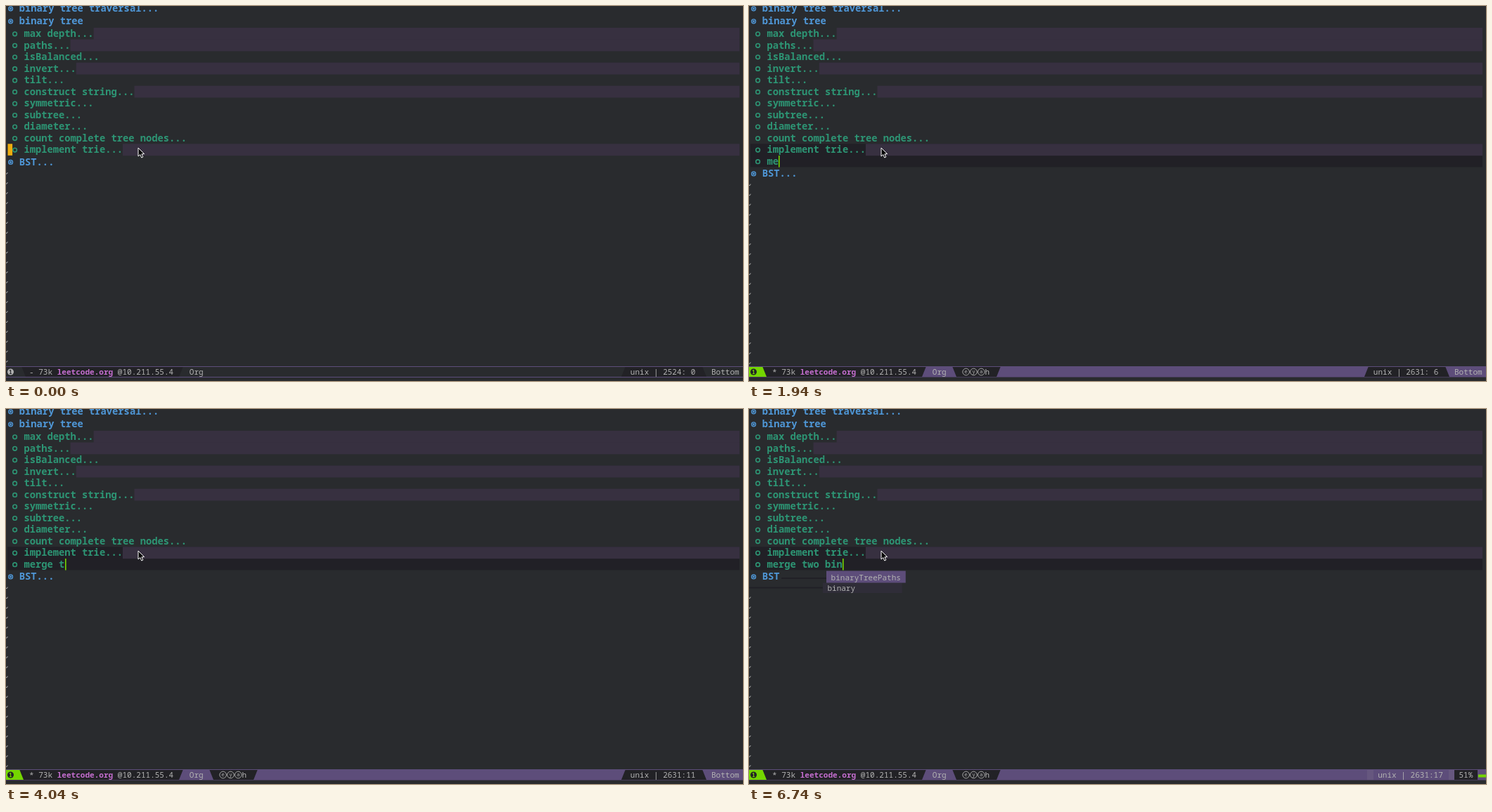
These frames come from a looping animation (1048x534 px, 8000 ms). An HTML page with a canvas:

```html
<!DOCTYPE html>
<html lang="en">
<head>
<meta charset="utf-8">
<title>Outline editing</title>
<style>
  html, body { margin: 0; width: 100%; height: 100%; overflow: hidden; background: #292b2e; }
  canvas { display: block; }
</style>
</head>
<body>
<canvas id="stage" width="1048" height="534"></canvas>
<script>
const ctx = document.getElementById('stage').getContext('2d');
const LOOP = 8000;
const C = {
  bg: '#292b2e', dark: '#212026', bar: '#222226', block: '#373040', purple: '#5d4d7a',
  text: '#b2b2b2', blue: '#4f97d7', green: '#2d9574', lime: '#74d600',
  gold: '#eead0e', pink: '#c56ed0', tip: '#2f2d38'
};
const BIG = 13.78, SMALL = 11.03;
const ROW = 16.53, TOP = 31, TEXT_X = 25.4, CELL = BIG * 0.6;
const BAR_Y = 513, BAR_H = 15;

const items = ['max depth', 'paths', 'isBalanced', 'invert', 'tilt', 'construct string',
  'symmetric', 'subtree', 'diameter', 'count complete tree nodes', 'implement trie'];
const shaded = [0, 1, 3, 5, 10];

// start time, typed text, column shown, completion list
const steps = [
  [1050, '', 4], [1790, 'm', 5], [1940, 'me', 6],
  [2240, 'me', 6, ['median', 'merge']],
  [2390, 'mer', 7], [2690, 'merg', 8], [2990, 'merge', 9],
  [3740, 'merge ', 10], [4040, 'merge t', 11], [4790, 'merge two', 13],
  [5090, 'merge two ', 13], [5240, 'merge two ', 14],
  [6290, 'merge two b', 15], [6440, 'merge two bi', 16], [6590, 'merge two bin', 17],
  [6740, 'merge two bin', 17, ['binaryTreePaths', 'binary']]
];

function rect(x, y, w, h, color) {
  ctx.fillStyle = color;
  ctx.fillRect(x, y, w, h);
}

function poly(points, color) {
  ctx.beginPath();
  points.forEach(([x, y]) => ctx.lineTo(x, y));
  ctx.closePath();
  ctx.fillStyle = color;
  ctx.fill();
}

function circle(x, y, r, fill, stroke, width = 1) {
  ctx.beginPath();
  ctx.arc(x, y, r, 0, Math.PI * 2);
  if (fill) { ctx.fillStyle = fill; ctx.fill(); }
  if (stroke) { ctx.strokeStyle = stroke; ctx.lineWidth = width; ctx.stroke(); }
}

// Text on a fixed character grid, like a terminal.
function mono(str, x, y, size, color, bold) {
  ctx.font = `${bold ? 'bold ' : ''}${size}px "Noto Sans Mono", "DejaVu Sans Mono", monospace`;
  ctx.fillStyle = color;
  [...str].forEach((ch, i) => ctx.fillText(ch, x + i * size * 0.6, y));
}

function heading(str, baseline) {
  const y = baseline - 4.4;
  circle(6.6, y, 3.6, C.blue);
  circle(6.6, y, 1.9, null, C.bg, 0.8);
  mono(str, 18.8, baseline, BIG, C.blue, true);
}

function item(str, row) {
  const y = TOP + ROW * row;
  circle(12.6, y + 8.8, 2.8, null, C.green, 1.6);
  mono(str, TEXT_X, y + 13, BIG, C.green, true);
}

function tildes(from) {
  ctx.strokeStyle = C.text;
  ctx.lineWidth = 1;
  for (let y = from; y < 510; y += 14.1) {
    ctx.beginPath();
    ctx.moveTo(2.2, y - 1);
    ctx.quadraticCurveTo(2.2, y + 1, 0, y + 1.2);
    ctx.stroke();
  }
}

function pointer(x, y) {
  ctx.beginPath();
  [[0, 0], [0, 12], [2.8, 9.6], [4.8, 14], [6.8, 13], [4.9, 8.8], [8.6, 8.6]]
    .forEach(([dx, dy]) => ctx.lineTo(x + dx, y + dy));
  ctx.closePath();
  ctx.fillStyle = '#000';
  ctx.fill();
  ctx.strokeStyle = '#fff';
  ctx.lineWidth = 1;
  ctx.stroke();
}

// Bar section; lean is the sideways shift of each edge towards the bottom.
function section(x0, x1, color, lean0 = 0, lean1 = 0) {
  const b = BAR_Y + BAR_H;
  poly([[x0, BAR_Y], [x1, BAR_Y], [x1 + lean1, b], [x0 + lean0, b]], color);
}

function barText(str, x, color = C.text, bold = false) {
  mono(str, x, 525, SMALL, color, bold);
}

function badge(fill, ink) {
  circle(6.5, 521, 4.5, fill);
  mono('1', 4.1, 523.9, 8, ink, true);
}

function modeLine(active, position, popup) {
  if (active) {
    section(0, 1048, C.purple);
    section(18, 252, C.bar, 0, -6);
    section(0, 19, C.lime, 0, 6);
    section(289, 358, C.bar, 6, -6);
    badge(C.bar, C.lime);
    ['e', 'y', 'a'].forEach((ch, i) => {
      const x = 308.6 + i * 10.8;
      circle(x, 521, 4.8, null, C.text, 0.9);
      mono(ch, x - 2.25, 523.2, 7.5, C.text);
    });
    barText('h', 335.6);
  } else {
    section(0, 1048, C.bg);
    section(22, 252, C.bar, 6, -6);
    section(881, 990, C.bar, -6, 6);
    badge(C.text, C.bg);
  }
  barText((active ? '*' : '-') + ' 73k', 33);
  barText('leetcode.org', 72.7, C.pink, true);
  barText('@10.211.55.4', 158.8);
  barText('Org', 260.8);
  if (popup) {
    section(879, 888, '#66577f');
    section(995, 1003, '#66577f');
    section(1003, 1036, C.bar);
    barText(position, 894.2);
    barText('51%', 1009.5);
    rect(1037, 520.5, 11, 4, C.lime);
  } else {
    if (active) section(881, 990, C.bar, -6, 6);
    barText(position, 887.8);
    barText('Bottom', 1003);
  }
  rect(0, BAR_Y, 1048, 1, C.purple);
  rect(0, BAR_Y + BAR_H, 1048, 1, active ? '#453c58' : C.purple);
}

function completions([first, second], x) {
  const width = first.length * SMALL * 0.6 + 13.5;
  const left = x - 5;
  rect(left - 5, 247.5, width, 14.5, C.tip);
  rect(left, 230.5, width, 17, C.purple);
  rect(0, 253.5, left - 5, 2, C.dark);
  if (left > 60) rect(46, 240, left - 46, 2, C.dark);
  mono(first, left + 6.6, 243.6, SMALL, C.text);
  mono(second, left + 1.4, 258.6, SMALL, C.text);
}

function draw(t) {
  const step = steps.filter(s => t >= s[0]).pop();
  const active = t >= 150;
  const [, typed = '', column = 0, popup] = step || [];
  const extra = step ? ROW : active ? 14.1 : 0;
  const newY = TOP + ROW * 11;

  rect(0, 0, 1048, 534, C.bg);
  if (active) rect(2, newY - ROW, 1041, ROW + extra, C.dark);
  shaded.forEach(i => {
    const x = TEXT_X + (items[i].length + 3) * CELL;
    rect(x, TOP + ROW * i, 1043 - x, ROW + 0.3, C.block);
  });

  heading('binary tree traversal...', 8.2);
  heading('binary tree', 26.2);
  if (!active) rect(2.5, newY - ROW, 6.6, ROW, C.gold);
  items.forEach((name, i) => item(name + '...', i));

  if (step) item(typed, 11);
  heading(popup ? 'BST' : 'BST...', 226.8 + extra);
  tildes((popup ? 252 : 238) + extra);

  const cursorX = step ? 25.9 + typed.length * CELL : 2.5;
  if (active) rect(Math.round(cursorX), 213, 1.6, extra, C.lime);
  if (popup) completions(popup, typed.length > 2 ? 115 : 32);

  const line = active ? 2631 : 2524;
  modeLine(active, `unix | ${line}:${String(column).padStart(2)}`, !!popup);
  pointer(188, 202);
}

const start = performance.now();
function tick() {
  draw((performance.now() - start) % LOOP);
  requestAnimationFrame(tick);
}
draw(0);
requestAnimationFrame(tick);
</script>
</body>
</html>
```
